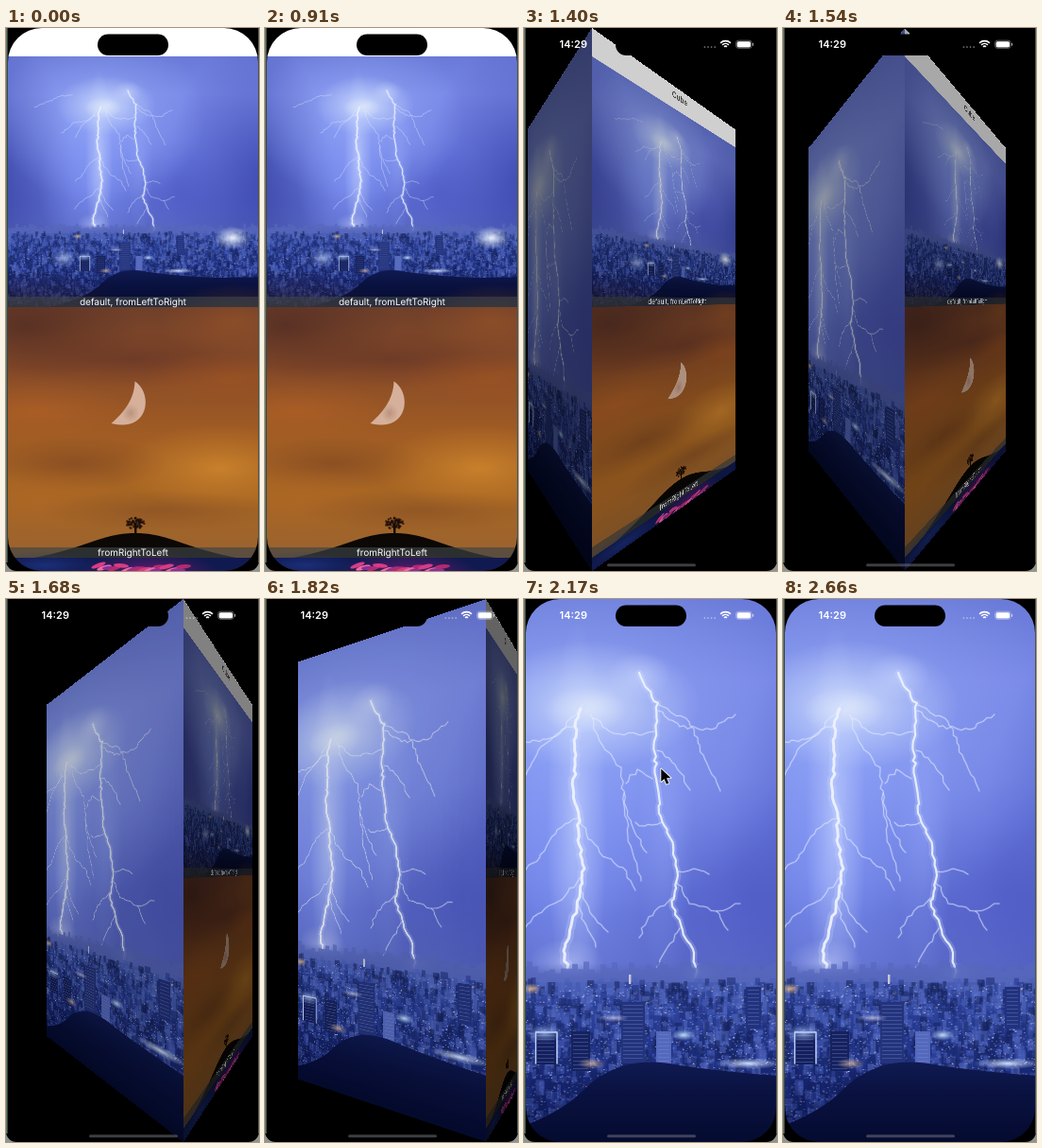
Recreate the animation shown at these times as an HTML page with a canvas. Size 268 by 574 pixels, loop 3.85 s.

```html
<!DOCTYPE html>
<html lang="en">
<head>
<meta charset="utf-8">
<title>Cube transition</title>
<style>
html, body { margin: 0; width: 100%; height: 100%; overflow: hidden; background: #000; }
canvas { display: block; width: 100vw; height: 100vh; }
</style>
</head>
<body>
<canvas id="stage" width="268" height="574"></canvas>
<script>
const W = 268, H = 574, LEFT = 2, FACE = 265, RES = 2;
const LOOP = 3850, STEP = 70;
const TURN_FROM = 1120, TURN_START = 1018, TURN_TIME = 1063;
const POINTER_IN = 2170, POINTER_OUT = 2660;
const DEPTH = 0.006, SHADE = 0.7;
const FONT = 'Inter, Roboto, sans-serif';
const stage = document.getElementById('stage').getContext('2d');

function seeded(seed) {
  return () => {
    seed = (seed * 16807) % 2147483647;
    return seed / 2147483647;
  };
}

function rect(g, x, y, w, h, color) {
  g.fillStyle = color;
  g.fillRect(x, y, w, h);
}

function pill(g, x, y, w, h, r, color) {
  g.fillStyle = color;
  g.beginPath();
  g.roundRect(x, y, w, h, r);
  g.fill();
}

function glow(g, x, y, rx, ry, rgb, alpha) {
  const fade = g.createRadialGradient(0, 0, 0, 0, 0, 1);
  fade.addColorStop(0, `rgba(${rgb},${alpha})`);
  fade.addColorStop(0.5, `rgba(${rgb},${alpha * 0.45})`);
  fade.addColorStop(1, `rgba(${rgb},0)`);
  g.save();
  g.translate(x, y);
  g.scale(rx, ry);
  rect(g, -1, -1, 2, 2, fade);
  g.restore();
}

function ramp(g, y0, y1, stops) {
  const fill = g.createLinearGradient(0, y0, 0, y1);
  stops.forEach(([at, color]) => fill.addColorStop(at, color));
  return fill;
}

function label(g, text, x, y, size, weight, color) {
  g.font = `${weight} ${size}px ${FONT}`;
  g.textAlign = 'center';
  g.textBaseline = 'middle';
  g.fillStyle = color;
  g.fillText(text, x, y);
}

// Jagged line through the given x, y pairs
function bolt(g, rnd, width, alpha, pts) {
  g.beginPath();
  g.moveTo(pts[0], pts[1]);
  for (let i = 2; i < pts.length; i += 2) {
    const [x0, y0, x1, y1] = pts.slice(i - 2, i + 2);
    const n = Math.max(2, Math.round(Math.hypot(x1 - x0, y1 - y0) / 5));
    for (let k = 1; k <= n; k++) {
      const j = k < n ? 3.6 : 0;
      g.lineTo(x0 + (x1 - x0) * k / n + (rnd() - 0.5) * j,
               y0 + (y1 - y0) * k / n + (rnd() - 0.5) * j);
    }
  }
  g.lineJoin = g.lineCap = 'round';
  g.lineWidth = width * 3.2;
  g.strokeStyle = `rgba(205,218,255,${alpha * 0.25})`;
  g.stroke();
  g.lineWidth = width;
  g.strokeStyle = `rgba(236,242,255,${alpha})`;
  g.stroke();
}

function lightning(g, rnd) {
  const twig = (...pts) => bolt(g, rnd, 0.75, 0.68, pts);
  twig(62, 112, 40, 138, 15, 160, 2, 186);
  twig(54, 132, 25, 148, 0, 151, -30, 175);
  twig(-5, 88, -35, 92, -60, 104, -92, 116);
  twig(70, 122, 80, 150, 103, 178, 106, 215, 118, 248, 130, 268);
  twig(72, 126, 95, 142, 120, 143, 138, 140);
  twig(106, 205, 110, 250, 124, 298);
  twig(142, 118, 165, 135, 198, 138, 224, 122);
  twig(143, 112, 175, 130, 190, 165, 208, 203);
  twig(141, 160, 160, 175, 176, 202);
  twig(136, 190, 120, 180, 108, 195);
  twig(57, 232, 35, 244, 22, 266, 2, 286);
  twig(59, 236, 80, 268, 105, 284, 118, 308);
  twig(63, 292, 40, 318, 10, 336, 0, 350);
  twig(60, 308, 72, 334, 89, 352);
  twig(57, 322, 66, 345, 76, 368);
  twig(163, 288, 180, 285, 196, 291);
  twig(161, 298, 175, 322, 204, 330, 229, 322);
  twig(160, 314, 132, 336, 122, 358);
  twig(165, 348, 152, 368, 140, 390);
  twig(204, 330, 216, 350);
  twig(146, 236, 128, 240, 118, 236);
  bolt(g, rnd, 3, 0.95, [60, 116, 54, 135, 55, 165, 52, 200, 58, 230, 57, 255,
    64, 285, 59, 315, 50, 345, 42, 372, 46, 390]);
  bolt(g, rnd, 2.2, 0.92, [122, 78, 128, 92, 142, 110, 138, 150, 140, 190, 145, 230,
    158, 260, 163, 292, 157, 325, 168, 350, 180, 374, 183, 407]);
}

function city(g, rnd) {
  rect(g, -153, 385, 574, 22, ramp(g, 385, 407, [[0, 'rgba(84,98,184,0)'], [1, 'rgba(74,90,176,0.9)']]));
  for (let x = -153; x < 421; x += 6) {
    const h = rnd() * 14;
    rect(g, x, 396 - h, 6, h + 12, 'rgba(88,104,190,0.7)');
  }
  rect(g, -153, 405, 574, 169, ramp(g, 405, H,
    [[0, '#4a5eb4'], [0.18, '#2f449c'], [0.5, '#1c2c7c'], [0.75, '#101c5c'], [1, '#070f40']]));
  const blocks = ['#1b2a70', '#4a5fb8', '#15215c', '#566cc4', '#24378c'];
  const lamps = ['#8eaaff', '#dbe6ff', '#7692f0', '#f0cba0', '#a9c2ff'];
  const pick = colors => colors[Math.floor(rnd() * colors.length)];
  for (let y = 406; y < 566; y += 6) {
    const dim = y < 500 ? 1 : 0.6;
    for (let x = -153; x < 421; x += 8) {
      const bx = x + rnd() * 7, bh = 5 + rnd() * 12;
      g.globalAlpha = 0.55 * dim;
      rect(g, bx, y - rnd() * 6, 3 + rnd() * 6, bh, pick(blocks));
      g.globalAlpha = (0.3 + rnd() * 0.6) * dim;
      for (let k = 0; k < 3; k++) rect(g, bx + rnd() * 8, y + rnd() * bh, 1 + rnd(), 1, pick(lamps));
    }
  }
  g.globalAlpha = 1;
  const tower = (x, y, w, h, color) => {
    rect(g, x, y, w, h, color);
    for (let r = y + 3; r < y + h - 2; r += 4) rect(g, x + 2, r, w - 4, 0.8, 'rgba(130,150,225,0.4)');
  };
  tower(103, 426, 25, 65, '#24347c');
  tower(50, 457, 20, 42, '#16225e');
  tower(140, 457, 16, 34, '#5468bc');
  tower(235, 410, 16, 44, '#22327c');
  tower(12, 458, 22, 34, '#14205c');
  g.strokeStyle = '#c4d6ff';
  g.lineWidth = 1.4;
  g.beginPath();
  g.moveTo(12.5, 491);
  g.lineTo(12.5, 458);
  g.lineTo(35, 458);
  g.lineTo(35, 491);
  g.stroke();

  // Wooded hill
  g.fillStyle = ramp(g, 488, H, [[0, '#101b52'], [0.4, '#0a1240'], [1, '#050b30']]);
  g.beginPath();
  g.moveTo(-60, H);
  g.quadraticCurveTo(30, 555, 66, 516);
  g.quadraticCurveTo(105, 480, 165, 493);
  g.quadraticCurveTo(300, 512, 421, 505);
  g.lineTo(421, H);
  g.fill();
  glow(g, 8, 412, 10, 6, '255,200,130', 0.8);
  glow(g, 72, 491, 15, 6, '245,205,170', 0.7);
  glow(g, 95, 443, 16, 4, '225,220,240', 0.7);
  glow(g, 22, 459, 20, 10, '180,205,255', 0.7);
  glow(g, 169, 461, 13, 6, '190,220,255', 1);
  glow(g, 238, 491, 36, 6, '205,222,255', 1);
  glow(g, -25, 462, 28, 20, '190,210,255', 0.7);
  glow(g, 362, 416, 42, 26, '235,243,255', 1);
  rect(g, 111, 397, 2.4, 10, '#c8c7d8');
}

// City storm picture, 574 square, centred on the stage
function storm(g) {
  const rnd = seeded(4711);
  g.save();
  g.beginPath();
  g.rect(-153, 0, 574, 574);
  g.clip();
  rect(g, -153, 0, 574, H, ramp(g, 0, H,
    [[0, '#6a7ad8'], [0.15, '#7887e6'], [0.4, '#6a7ae0'], [0.58, '#5c6bd0'], [0.67, '#5a69c8'], [0.7, '#5a69b8']]));
  glow(g, -190, 280, 190, 330, '40,50,140', 0.65);
  glow(g, 440, 280, 230, 330, '46,56,158', 0.65);
  glow(g, 240, 310, 110, 120, '70,80,190', 0.4);
  glow(g, 60, 140, 240, 200, '160,182,255', 0.7);
  glow(g, 45, 290, 130, 190, '138,160,255', 0.6);
  glow(g, 72, 112, 115, 68, '212,226,252', 0.85);
  glow(g, 64, 118, 44, 24, '235,240,248', 0.6);
  glow(g, 122, 82, 34, 26, '210,222,255', 0.5);
  glow(g, 56, 235, 32, 210, '205,218,255', 0.6);
  glow(g, 150, 240, 30, 190, '160,180,255', 0.3);
  glow(g, 45, 385, 40, 26, '205,215,252', 0.5);
  glow(g, 184, 402, 26, 18, '195,208,252', 0.5);
  lightning(g, rnd);
  city(g, rnd);
  g.restore();
}

// Dusk picture, 265 square
function dusk(g) {
  rect(g, 0, 0, 265, 265, ramp(g, 0, 265,
    [[0, '#70402a'], [0.25, '#8a4c28'], [0.5, '#a05c24'], [0.75, '#a86623'], [1, '#9a6330']]));
  glow(g, 20, 20, 120, 60, '70,38,34', 0.6);
  glow(g, 130, 55, 150, 30, '92,48,38', 0.55);
  glow(g, 240, 15, 80, 40, '160,88,40', 0.5);
  glow(g, 30, 110, 110, 30, '182,98,38', 0.6);
  glow(g, 235, 75, 90, 28, '160,84,34', 0.55);
  glow(g, 225, 170, 110, 45, '212,138,46', 0.75);
  glow(g, 70, 165, 100, 28, '120,66,34', 0.55);
  glow(g, 35, 205, 90, 35, '178,104,38', 0.5);
  glow(g, 160, 215, 130, 22, '126,74,36', 0.5);

  g.fillStyle = '#d6b09a';
  g.beginPath();
  g.moveTo(134.5, 78.5);
  g.bezierCurveTo(154, 91, 150, 133, 109.5, 123);
  g.bezierCurveTo(121, 113, 134, 99, 134.5, 78.5);
  g.fill();
  glow(g, 130, 112, 9, 10, '160,116,96', 0.5);

  g.fillStyle = '#0b0806';
  g.beginPath();
  g.moveTo(28, 265);
  g.bezierCurveTo(85, 254, 100, 239, 135, 239);
  g.bezierCurveTo(170, 239, 185, 254, 242, 265);
  g.fill();
  rect(g, 134, 228, 2.4, 13, '#120a06');
  const rnd = seeded(99);
  g.fillStyle = 'rgba(28,15,9,0.75)';
  for (let k = 0; k < 70; k++) {
    const a = rnd() * Math.PI * 2, r = Math.sqrt(rnd());
    g.beginPath();
    g.arc(135 + Math.cos(a) * r * 9.5, 228.5 + Math.sin(a) * r * 6, 1.2, 0, 7);
    g.fill();
  }
}

function bloom(g) {
  rect(g, 0, 0, 265, 20, '#111a50');
  glow(g, 40, 8, 60, 14, '30,52,130', 0.8);
  glow(g, 150, 20, 75, 28, '120,30,120', 0.9);
  const rnd = seeded(31), petals = ['#d83c86', '#ee6aa4', '#8c2f9c', '#b32a6e'];
  for (let k = 0; k < 16; k++) {
    g.fillStyle = petals[k % 4];
    g.beginPath();
    g.ellipse(96 + k * 6, 8 + rnd() * 6, 8, 2.2, -0.4 + rnd() * 0.5, 0, 7);
    g.fill();
  }
}

function caption(g, text, y) {
  rect(g, LEFT, y, FACE, 11, 'rgba(62,68,70,0.66)');
  label(g, text, 134.5, y + 6, 9.9, 400, '#fff');
}

function list(g) {
  rect(g, 0, 0, W, H, '#fff');
  label(g, 'Cube', 134.5, 12, 11.6, 600, '#55524f');
  const k = FACE / 574;
  const at = (x, y, scale, draw) => {
    g.save();
    g.translate(x, y);
    g.scale(scale, scale);
    draw(g);
    g.restore();
  };
  at(LEFT + 153 * k, 30, k, storm);
  at(LEFT, 295, 1, dusk);
  at(LEFT, 560, 1, bloom);
  caption(g, 'default, fromLeftToRight', 284);
  caption(g, 'fromRightToLeft', 549);
}

function paintFace(draw) {
  const c = document.createElement('canvas');
  c.width = FACE * RES;
  c.height = H * RES;
  const g = c.getContext('2d');
  g.scale(RES, RES);
  g.translate(-LEFT, 0);
  draw(g);
  return c;
}

const listFace = paintFace(list), stormFace = paintFace(storm);

// One cube side, hinged at x and receding to the right (dir 1) or left (dir -1).
// The perspective weakens as the side turns away.
function side(face, hinge, angle, dir, shade) {
  const cos = Math.cos(angle), sin = DEPTH * cos * Math.sin(angle);
  const reach = FACE * cos / (1 + FACE * sin);
  const along = d => Math.min(FACE, d / (cos - d * sin));
  for (let d = 0; d < Math.round(reach); d++) {
    const u = along(d), du = Math.max(0.3, along(d + 1) - u);
    const s = 1 / (1 + (u + du / 2) * sin);
    const x = dir > 0 ? hinge + d : hinge - d - 1;
    const sx = dir > 0 ? u : Math.max(0, FACE - u - du);
    const y = H / 2 * (1 - s);
    stage.drawImage(face, sx * RES, 0, Math.min(du, FACE - sx) * RES, H * RES, x, y, 1, H * s);
    rect(stage, x, y, 1, H * s, `rgba(0,0,0,${shade})`);
  }
}

// Ease-in-out: cubic Bezier (.42, 0, .58, 1)
function ease(x) {
  if (x <= 0 || x >= 1) return Math.min(1, Math.max(0, x));
  let lo = 0, hi = 1;
  for (let i = 0; i < 24; i++) {
    const s = (lo + hi) / 2, r = 1 - s;
    if (1.26 * s * r * r + 1.74 * s * s * r + s * s * s < x) lo = s; else hi = s;
  }
  return lo * lo * (3 - 2 * lo);
}

function cube(p) {
  if (p === 0 || p === 1) {
    stage.drawImage(p ? stormFace : listFace, LEFT, 0, FACE, H);
    return;
  }
  const hinge = Math.round(W * p - 0.5);
  const turn = Math.PI / 2 * p;
  side(stormFace, hinge, Math.PI / 2 - turn, -1, SHADE * (1 - p));
  side(listFace, hinge, turn, 1, SHADE * p);
}

function statusBar() {
  label(stage, '14:29', 52.3, 17.8, 11, 600, '#fff');
  for (let i = 0; i < 4; i++) pill(stage, 190.5 + i * 3.6, 19.2, 1.8, 1.8, 0.9, 'rgba(255,255,255,0.45)');
  stage.strokeStyle = '#fff';
  stage.lineCap = 'butt';
  stage.lineWidth = 1.7;
  for (const r of [2, 4.8, 7.6]) {
    stage.beginPath();
    stage.arc(213.5, 21.3, r, -Math.PI * 0.75, -Math.PI * 0.25);
    stage.stroke();
  }
  stage.lineWidth = 0.7;
  stage.strokeStyle = 'rgba(255,255,255,0.5)';
  stage.beginPath();
  stage.roundRect(224.6, 13.2, 16.6, 8.2, 2.6);
  stage.stroke();
  pill(stage, 225.6, 14.2, 14.6, 6.2, 1.7, '#fff');
  pill(stage, 242, 15.8, 1.2, 3, 0.6, 'rgba(255,255,255,0.6)');
}

// Fills the stage outside a rounded box
function surround(x, y, w, h, r, color) {
  stage.fillStyle = color;
  stage.beginPath();
  stage.rect(0, 0, W, H);
  stage.roundRect(x, y, w, h, r);
  stage.fill('evenodd');
}

function bezel() {
  surround(LEFT, 0, FACE, H, 36, '#000');
  surround(0, -20, W, H + 20, 11, '#8b9490');
  rect(stage, 0, 0, 1.6, H - 9, '#64786c');
  rect(stage, W - 1, 0, 1, H - 9, '#4a5450');
}

function pointer(x, y) {
  stage.save();
  stage.translate(x, y);
  stage.scale(0.85, 0.85);
  stage.beginPath();
  [[0, 0], [0, 16], [3.8, 12.6], [6.6, 19.2], [9.6, 18], [6.8, 11.6], [12, 11.4]]
    .forEach(([px, py]) => stage.lineTo(px, py));
  stage.closePath();
  stage.lineJoin = 'round';
  stage.lineWidth = 2;
  stage.strokeStyle = '#fff';
  stage.stroke();
  stage.fillStyle = '#000';
  stage.fill();
  stage.restore();
}

function render(now) {
  const t = Math.floor((now % LOOP) / STEP) * STEP;
  const turning = t >= TURN_FROM;
  rect(stage, 0, 0, W, H, '#000');
  cube(turning ? ease((t - TURN_START) / TURN_TIME) : 0);
  statusBar();
  pill(stage, 97, 6.5, 75, 22.5, 11.25, '#000');
  if (turning) pill(stage, 88, 566.3, 94, 3, 1.5, 'rgba(120,122,130,0.5)');
  bezel();
  if (t >= POINTER_IN && t < POINTER_OUT) pointer(145.3, 179.5);
}

const start = performance.now();
function tick() {
  render(performance.now() - start);
  requestAnimationFrame(tick);
}
tick();
</script>
</body>
</html>
```
